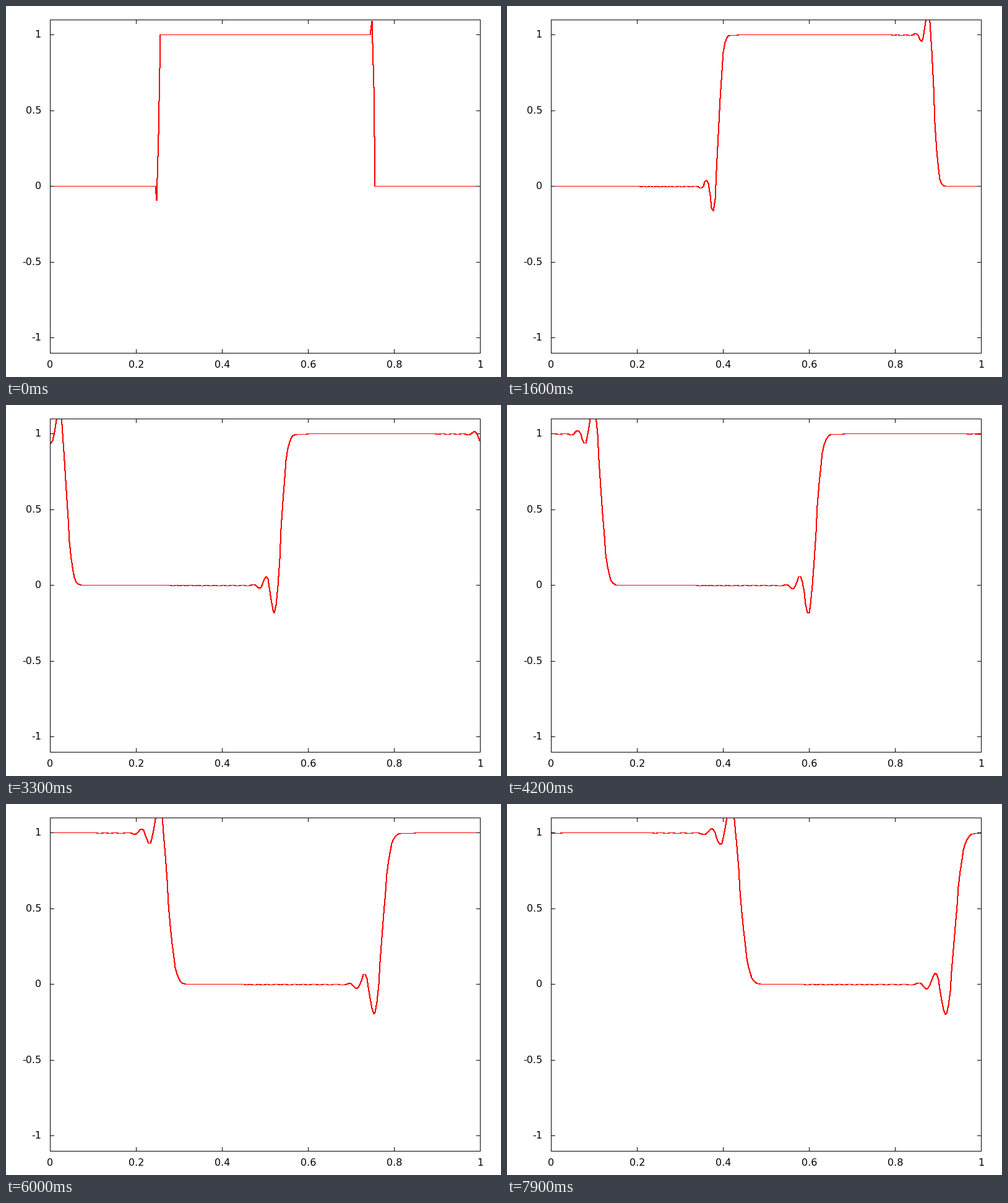
A matplotlib script that plays this animation: 800x600 px, repeating every 8 s.

```python
import numpy as np
import matplotlib.pyplot as plt
from matplotlib.animation import FuncAnimation
from matplotlib.patches import Rectangle

W, H, DPI = 800, 600, 100
LEFT, RIGHT, TOP, BOTTOM = 71, 766, 22, 561
YMAX = 1.1
CELLS, COURANT = 256, 0.75
FRAMES, STEPS = 80, 3
TICK = 6

plt.rcParams["path.simplify"] = False
plt.rcParams["font.family"] = "DejaVu Sans"


def px(x):
    return np.floor(LEFT + (RIGHT - LEFT) * np.asarray(x) + 0.5)


def py(y):
    scale = (BOTTOM - TOP) / (2 * YMAX)
    return BOTTOM - np.floor((np.asarray(y) + YMAX) * scale + 0.5)


def lax_wendroff(u, c=COURANT):
    """One periodic advection step."""
    return (c * (1 + c) / 2 * np.roll(u, 1) + (1 - c * c) * u
            - c * (1 - c) / 2 * np.roll(u, -1))


def six_digits(u):
    return np.array([float(f"{v:.6g}") for v in u])


def solve(x):
    u = lax_wendroff(np.where((x > 0.25) & (x < 0.75), 1.0, 0.0))
    rows = []
    for _ in range(FRAMES):
        rows.append(py(six_digits(u)))
        for _ in range(STEPS):
            u = lax_wendroff(u)
    return rows


fig = plt.figure(figsize=(W / DPI, H / DPI), dpi=DPI, facecolor="white")
ax = fig.add_axes([0, 0, 1, 1])
ax.set_xlim(0, W)
ax.set_ylim(H, 0)
ax.axis("off")


def pen(xs, ys, color, z):
    """One-pixel hard-edged polyline through pixel centres."""
    line, = ax.plot(np.asarray(xs) + 0.5, np.asarray(ys) + 0.5, color=color,
                    lw=72 / DPI, antialiased=False, snap=False, zorder=z,
                    solid_capstyle="projecting", solid_joinstyle="bevel")
    return line


def label(x, y, text, ha):
    ax.text(x, y, text, ha=ha, va="baseline", fontsize=16 * 72 / DPI,
            color="black")


pen([LEFT, RIGHT, RIGHT, LEFT, LEFT], [TOP, TOP, BOTTOM, BOTTOM, TOP],
    "black", 3)

for v in np.arange(6) / 5:
    x = px(v)
    pen([x, x], [TOP, TOP + TICK], "black", 3)
    pen([x, x], [BOTTOM - TICK, BOTTOM], "black", 3)
    label(x + 0.5, 585, f"{v:g}", "center")

for v in np.arange(-2, 3) / 2:
    y = py(v)
    pen([LEFT, LEFT + TICK], [y, y], "black", 3)
    pen([RIGHT - TICK, RIGHT], [y, y], "black", 3)
    label(57, y + 5, f"{v:g}", "right")

centres = (np.arange(CELLS) + 0.5) / CELLS
rows = solve(centres)
curve = pen(px(centres), rows[0], "red", 2)
curve.set_clip_path(Rectangle((LEFT, TOP), RIGHT - LEFT + 1, BOTTOM - TOP + 1,
                              transform=ax.transData))


def update(i):
    curve.set_ydata(rows[i] + 0.5)
    return curve,


anim = FuncAnimation(fig, update, frames=FRAMES, interval=100, repeat=True,
                     repeat_delay=0)
plt.show()
```
